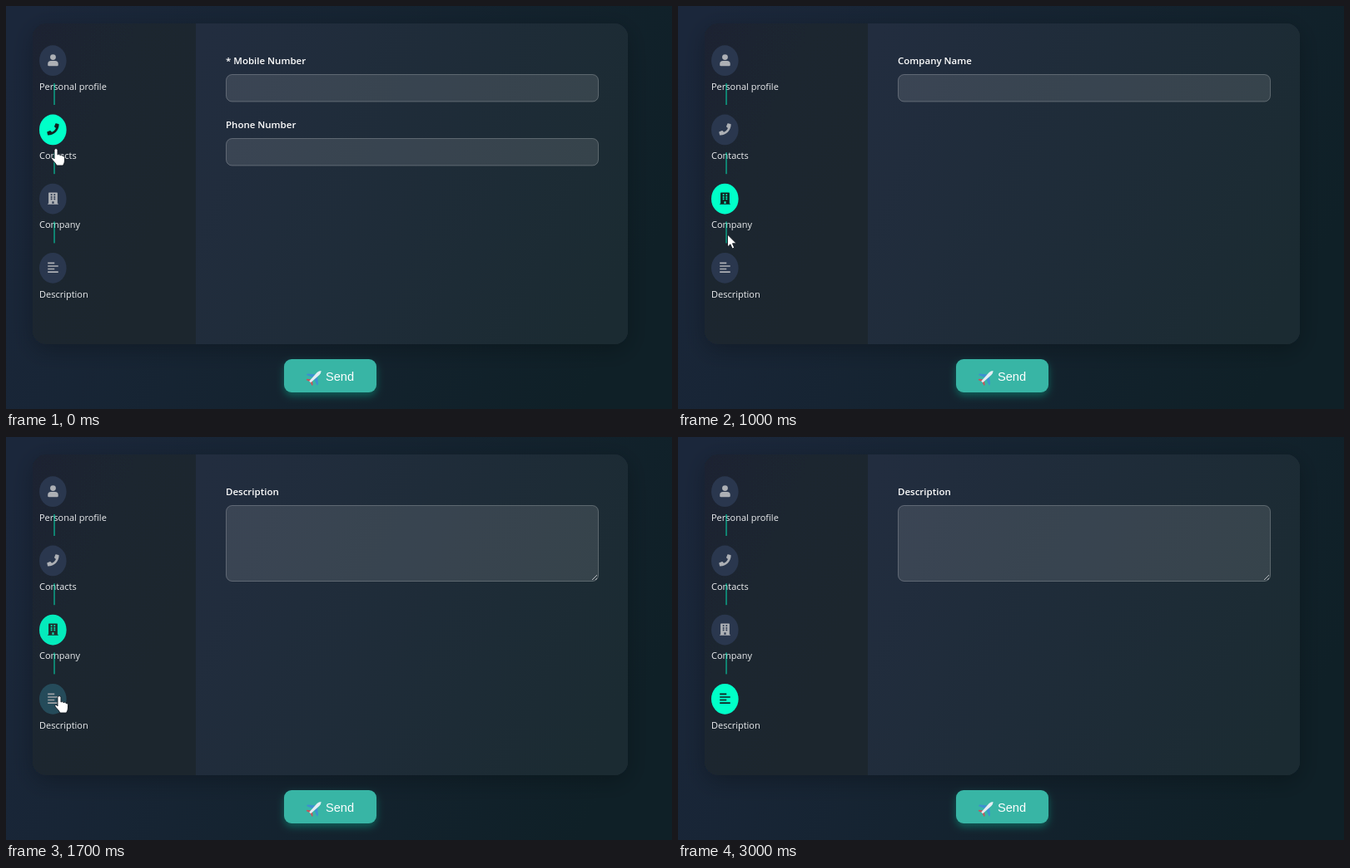
Write an HTML page that moves like this. It is 800x485 px and loops after 3.1 s.

```html
<!DOCTYPE html>
<html lang="en">
<head>
<meta charset="utf-8">
<title>Stepped form</title>
<style>
  html, body { margin: 0; width: 100%; height: 100%; overflow: hidden; background: #14222d; }
  svg { display: block; }
  text { font-family: "Open Sans", "Noto Sans", sans-serif; font-size: 11px; fill: #eceef0; }
  .label { font-size: 11.5px; font-weight: 600; fill: #fff; }
  .field { fill: #fff; fill-opacity: .115; stroke: #fff; stroke-opacity: .24; }
  .send { font: 14.6px "Liberation Sans", Arial, sans-serif; fill: #fff; }
</style>
</head>
<body>
<svg width="800" height="485" viewBox="0 0 800 485">
  <defs>
    <linearGradient id="page" gradientUnits="userSpaceOnUse" x1="40" y1="0" x2="760" y2="330">
      <stop stop-color="#1b273b"/><stop offset="1" stop-color="#0f2027"/>
    </linearGradient>
    <linearGradient id="side" gradientUnits="userSpaceOnUse" x1="32" y1="21" x2="250" y2="120">
      <stop stop-color="#1b2430"/><stop offset="1" stop-color="#1c262f"/>
    </linearGradient>
    <linearGradient id="main" gradientUnits="userSpaceOnUse" x1="228" y1="60" x2="747" y2="300">
      <stop stop-color="#222d3f"/><stop offset="1" stop-color="#1b2b32"/>
    </linearGradient>
    <filter id="shade" x="-20%" y="-20%" width="140%" height="140%">
      <feDropShadow dx="0" dy="7" stdDeviation="14" flood-color="#000" flood-opacity=".25"/>
    </filter>
    <filter id="glow" x="-30%" y="-50%" width="160%" height="220%">
      <feDropShadow dx="0" dy="4" stdDeviation="5" flood-color="#00ffc8" flood-opacity=".28"/>
    </filter>
    <g id="icon0">
      <circle cx="224" cy="128" r="122"/>
      <path d="M134 288h180a134 134 0 0 1 134 134v42a48 48 0 0 1-48 48H48a48 48 0 0 1-48-48v-42a134 134 0 0 1 134-134z"/>
    </g>
    <path id="icon1" transform="translate(-32 0)" d="M493 25l-104-24c-11-3-23 3-27 14l-48 112c-4 10-2 21 7 28l60 49c-36 77-99 141-177 177l-49-60c-7-8-18-11-28-7l-112 48c-11 5-17 16-14 27l24 104c2 11 12 19 23 19 256 0 464-208 464-464 0-11-8-21-19-23z"/>
    <path id="icon2" fill-rule="evenodd" d="M32 24Q32 0 56 0H392Q416 0 416 24V480H448V512H0V480H32zM126 64v64h64v-64zM258 64v64h64v-64zM126 160v64h64v-64zM258 160v64h64v-64zM126 256v64h64v-64zM258 256v64h64v-64zM186 384v96h76v-96z"/>
    <path id="icon3" d="M0 36H288V92H0zM0 164H448V220H0zM0 292H288V348H0zM0 420H448V476H0z"/>
  </defs>

  <rect width="800" height="485" fill="url(#page)"/>
  <rect x="32" y="21" width="715" height="386" rx="16" fill="url(#side)" filter="url(#shade)"/>
  <path d="M228 21H731a16 16 0 0 1 16 16V391a16 16 0 0 1-16 16H228z" fill="url(#main)"/>

  <g id="steps"></g>

  <g class="panel">
    <text class="label" x="264" y="70">* Mobile Number</text>
    <rect class="field" x="264.5" y="82.5" width="447" height="32.5" rx="7"/>
    <text class="label" x="264" y="147">Phone Number</text>
    <rect class="field" x="264.5" y="159.5" width="447" height="32.5" rx="7"/>
  </g>
  <g class="panel">
    <text class="label" x="264" y="70">Company Name</text>
    <rect class="field" x="264.5" y="82.5" width="447" height="32.5" rx="7"/>
  </g>
  <g class="panel">
    <text class="label" x="264" y="70">Description</text>
    <rect class="field" x="264.5" y="82.5" width="447" height="91" rx="7"/>
    <path d="M704 172l6-6M708 172l2-2" stroke="#c3c7ca" stroke-width=".9"/>
  </g>

  <rect x="334" y="425" width="111" height="40" rx="9" fill="#39b5a5" filter="url(#glow)"/>
  <g transform="translate(371.5 446) rotate(45)">
    <path d="M-1.5-2L-9 4v2l7.5-3zM1.5-2L9 4v2L1.5 3z" fill="#3d8fd1"/>
    <path d="M-1 6l-4 3v1.5L0 9l5 1.5V9L1 6z" fill="#c5545c"/>
    <path d="M0-10Q2-8 2-5L1.3 9h-2.6L-2-5Q-2-8 0-10z" fill="#e4edf3"/>
  </g>
  <text class="send" x="384" y="451">Send</text>

  <g id="cursor" stroke="#101820" stroke-width=".9" stroke-linejoin="round" fill="#fff">
    <path id="hand" d="M-2 1.5Q-2-.4 0-.4T2 1.5V7Q3.800 5.500 5 7.500 7 6.200 8 8.500 10.500 7.700 10.500 10.500V14Q10.500 17 8.500 20H1Q-.5 17-4.500 13-6 11-4.500 10.200-3.300 10-2 11.800z"/>
    <path id="arrow" d="M0 0V15l3.400-3.200L5.700 17l2.500-1.100L6 10.800h4.700z"/>
  </g>
</svg>
<script>
  const LOOP = 3100, FRAME = 100, FADE = 300;
  const byId = id => document.getElementById(id);
  const names = ['Personal profile', 'Contacts', 'Company', 'Description'];
  // Time at which each step is clicked
  const clicks = [Infinity, -FADE, 590, 1690];
  // Pointer stops: time, x, y
  const stops = [[0, 60, 172], [500, 57, 223], [700, 57, 223], [1000, 59.5, 275], [1200, 60, 282], [1500, 64, 312], [2000, 64, 312]];

  const icon = (i, color) =>
    `<use href="#icon${i}" fill="${color}" transform="translate(50.2 ${58 + 83.2 * i}) scale(.028)"/>`;
  const disc = (i, color) =>
    `<ellipse cx="56.300" cy="${65.7 + 83.2 * i}" rx="16.300" ry="18.400" fill="${color}"/>`;

  byId('steps').innerHTML = names.map((name, i) => `
    ${disc(i, '#2a374e')}${icon(i, '#adb0b5')}
    <g class="active">${disc(i, '#00ffc8')}${icon(i, '#10221f')}</g>
    <text x="40" y="${101 + 83.2 * i}">${name}</text>
    ${i < 3 ? `<rect x="57.200" y="${93 + 83.2 * i}" width="1.700" height="26" fill="#00ffc8" opacity=".5"/>` : ''}`).join('');

  const active = document.querySelectorAll('.active');
  const panels = document.querySelectorAll('.panel');
  const clamp = x => Math.min(1, Math.max(0, x));
  const show = (el, on) => el.style.display = on ? '' : 'none';
  const fade = (t, start) => 1 - (1 - clamp((t - start) / FADE)) ** 3;

  function pointer(t) {
    const k = stops.findIndex(s => s[0] > t);
    const [t0, x0, y0] = stops[k - 1], [t1, x1, y1] = stops[k];
    const u = (t - t0) / (t1 - t0), e = u * u * (3 - 2 * u);
    return [x0 + (x1 - x0) * e, y0 + (y1 - y0) * e];
  }

  function draw(t) {
    const current = t < 600 ? 0 : t < 1700 ? 1 : 2;
    panels.forEach((p, i) => show(p, i === current));
    active.forEach((el, i) =>
      el.setAttribute('opacity', fade(t, clicks[i]) * (1 - fade(t, clicks[i + 1] ?? Infinity))));

    const visible = t < 2000;
    show(byId('cursor'), visible);
    if (!visible) return;
    const [x, y] = pointer(t);
    const overStep = (y - 47) % 83.2 < 57;
    byId('cursor').setAttribute('transform', `translate(${x} ${y})`);
    show(byId('hand'), overStep);
    show(byId('arrow'), !overStep);
  }

  const start = performance.now();
  function tick() {
    const t = (performance.now() - start) % LOOP;
    draw(Math.floor(t / FRAME) * FRAME);
    requestAnimationFrame(tick);
  }
  tick();
</script>
</body>
</html>
```
